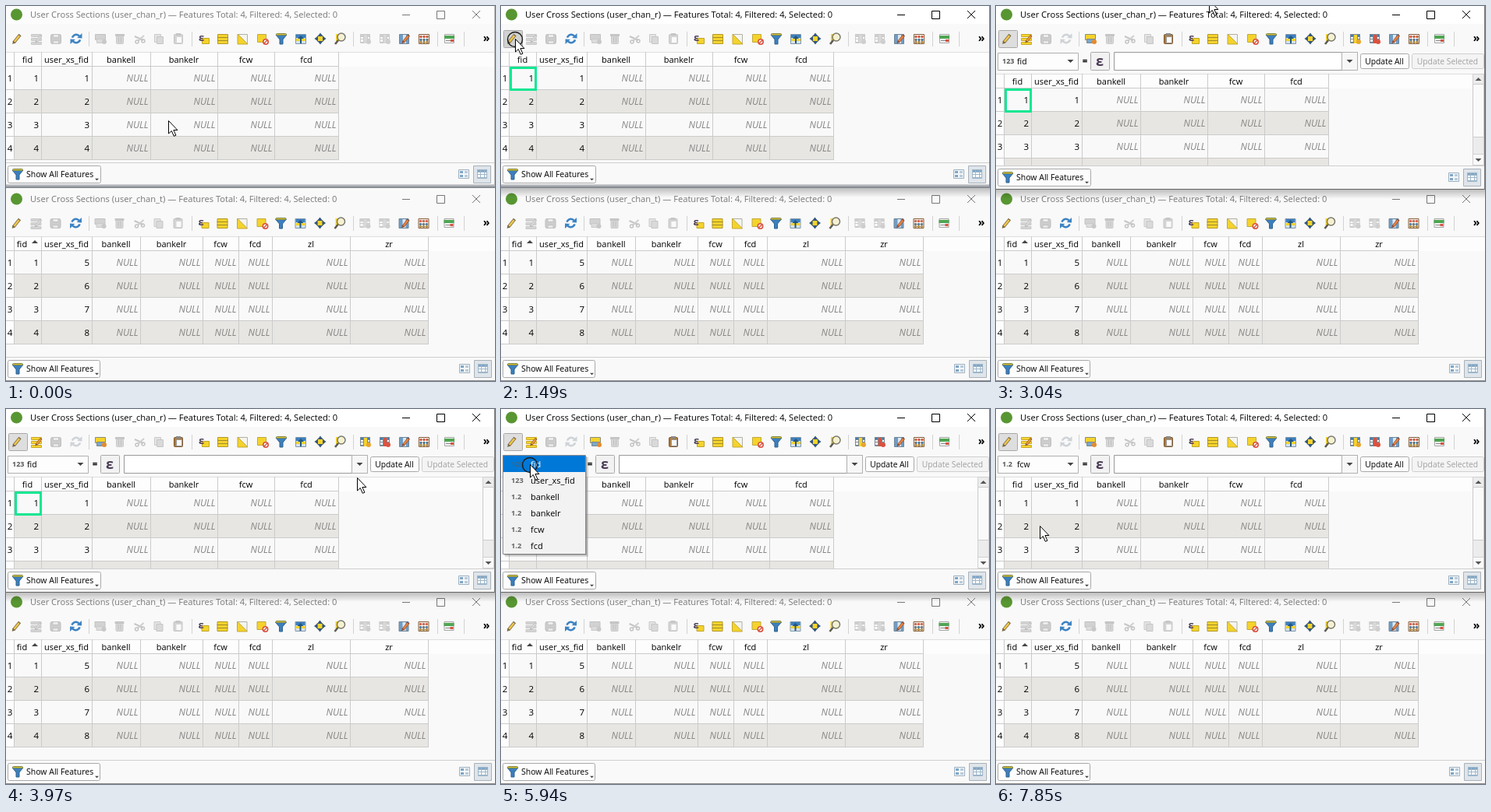
An HTML page with a canvas that plays this animation: 627 by 482 pixels, repeating every 7990 ms.

```html
<!DOCTYPE html>
<html lang="en">
<head>
<meta charset="utf-8">
<title>Attribute tables</title>
<style>
html, body { margin: 0; width: 100%; height: 100%; overflow: hidden; background: #f9f9f9; }
canvas { display: block; width: 627px; height: 482px; }
</style>
</head>
<body>
<canvas id="stage" width="627" height="482"></canvas>
<script>
const ctx = document.getElementById('stage').getContext('2d');
const LOOP = 7990, BG = '#f9f9f9', EDGE = '#cbcbcb', DIM = '#cacaca', INK = '#000';
const BLUE = '#3c7fbd', YELLOW = '#f5d32c', BROWN = '#ad7b3d', RED = '#d9513f';
const FAMILY = '"Open Sans", "Noto Sans", sans-serif';
const FIELDS = ['fid', 'user_xs_fid', 'bankell', 'bankelr', 'fcw', 'fcd'];
const PRESS = 1490, EDIT = 1640, OPEN = 5940, PICK = 7850, RING = 150;

// start, end, number of steps, then waypoints
const MOVES = [
  [370, 1090, 6, [56, 28], [18, 42]],
  [2530, 3040, 5, [133, 112], [175, 164], [279, 166], [279, 70], [273, -8]],
  [3170, 3430, 3, [152, 66]],
  [3580, 3970, 4, [300, 62], [450, 88]],
  [4720, 5140, 4, [134, 125]],
  [5280, 5680, 4, [37, 71]],
  [6390, 7020, 6, [61, 125]],
  [7160, 7320, 2, [56, 148]],
  [7470, 7470, 1, [56, 150]]
];

function cursorAt(t) {
  let pos = [208, 147];
  for (const [start, end, steps, ...points] of MOVES) {
    if (t < start) break;
    const done = steps > 1 ? Math.floor((t - start + 1) / (end - start) * (steps - 1)) + 1 : 1;
    const u = Math.min(done, steps) / steps * points.length;
    const i = Math.min(Math.floor(u), points.length - 1);
    const a = i ? points[i - 1] : pos, b = points[i];
    pos = a.map((v, k) => Math.round(v + (b[k] - v) * (u - i)));
  }
  return pos;
}

function paint(fill, stroke, width = 1) {
  if (fill) { ctx.fillStyle = fill; ctx.fill(); }
  if (stroke) { ctx.strokeStyle = stroke; ctx.lineWidth = width; ctx.stroke(); }
}
function box(x, y, w, h, fill, stroke, r = 0) {
  ctx.beginPath();
  if (stroke) ctx.roundRect(x + .5, y + .5, w - 1, h - 1, r);
  else ctx.roundRect(x, y, w, h, r);
  paint(fill, stroke);
}
function shape(points, fill, stroke, width) {
  ctx.beginPath();
  for (let i = 0; i < points.length; i += 2) ctx.lineTo(points[i], points[i + 1]);
  if (fill) ctx.closePath();
  paint(fill, stroke, width);
}
function disc(x, y, r, fill, stroke, width) {
  ctx.beginPath();
  ctx.arc(x, y, r, 0, 7);
  paint(fill, stroke, width);
}
function fade(y, h, from, to) {
  const g = ctx.createLinearGradient(0, y, 0, y + h);
  g.addColorStop(0, from);
  g.addColorStop(1, to);
  box(0, y, 627, h, g);
}
const hline = (x, y, w, c = EDGE) => box(x, y, w, 1, c);
const vline = (x, y, h, c = EDGE) => box(x, y, 1, h, c);
function text(str, x, y, size = 11, color = INK, align = 'left', style = '') {
  ctx.font = `${style} ${size}px ${FAMILY}`;
  ctx.textAlign = align;
  ctx.fillStyle = color;
  ctx.fillText(str, x, y);
}
function at(x, y, draw) {
  ctx.save();
  ctx.translate(x, y);
  draw();
  ctx.restore();
}
const caret = (x, y, s, c = '#444', dir = 1) =>
  shape([x - s, y - s * dir / 2, x + s, y - s * dir / 2, x, y + s * dir / 2], c);

function grid(x, y, w, h, head, line) {
  box(x, y, w, h, '#fff', line);
  box(x, y, w, 4, head, line);
  for (let i = 1; i < 3; i++) {
    vline(x + Math.round(w * i / 3), y, h, line);
    hline(x, y + 2 + Math.round(h * i / 3), w, line);
  }
}
function pen(x, y, s, body, tip) {
  shape([x - 4 * s, y + 5 * s, x + 4 * s, y - 5 * s], null, tip, 4 * s);
  shape([x - 3.2 * s, y + 4 * s, x + 3.2 * s, y - 4 * s], null, body, 2.6 * s);
  shape([x - 5.8 * s, y + 7 * s, x - 5 * s, y + 3 * s, x - 2.2 * s, y + 5.4 * s], tip);
}
function funnel() {
  shape([-7, -5, 7, -5, 2, 1, 2, 7, -2, 7, -2, 1], BLUE, '#2f628f');
  box(-7, -7, 14, 3, '#d8c23c', '#7f8746', 1);
}

const ICONS = {
  pencil: () => pen(0, 0, 1, '#efc64a', '#75664a'),
  multi(on) {
    for (let i = 0; i < 3; i++) box(-7, -6 + i * 5, 14, 4, on ? YELLOW : '#d4d4d4', on ? '#c9a92b' : DIM);
    pen(3, 0, .8, on ? '#f09a3c' : '#dadada', on ? '#8a5a2a' : '#bcbcbc');
  },
  save() {
    box(-7, -6, 14, 13, '#cdcdcd', '#bdbdbd', 2);
    box(-4, -6, 8, 5, '#ececec', '#c3c3c3');
    box(-4, 2, 8, 5, '#e6e6e6', '#c3c3c3');
  },
  refresh(on) {
    const c = on ? '#3d83c4' : '#cfd3d7';
    for (const turn of [0, Math.PI]) {
      ctx.save();
      ctx.rotate(turn);
      ctx.beginPath();
      ctx.arc(0, 0, 5.2, 3.4, 5.7);
      paint(null, c, 2.6);
      shape([7.5, -7, 7.5, -.5, 1.2, -1], c);
      ctx.restore();
    }
  },
  add(on) {
    box(-7, -6, 14, 8, on ? YELLOW : '#d2d2d2', on ? '#8c8c7a' : '#c2c2c2');
    box(-5, 0, 11, 6, on ? '#7aa7cd' : '#dcdcdc', on ? '#7c8790' : DIM);
    disc(5, 4, 3, on ? '#e58b2d' : '#c8c8c8');
  },
  trash() {
    box(-5, -4, 10, 11, '#d6d6d6', DIM, 1);
    box(-6, -6, 12, 3, '#cacaca', '#c2c2c2');
    for (const x of [-2, 1]) vline(x, -2, 7, '#c0c0c0');
  },
  cut() {
    shape([-6, -3, 5, 2], null, '#c6c6c6', 2);
    shape([6, -4, -2, 3], null, '#cfcfcf', 2);
    disc(-3, 4, 2, null, '#c4c4c4', 1.5);
    disc(5, 3, 2, null, '#c4c4c4', 1.5);
  },
  copy() {
    box(-6, -6, 9, 11, '#e4e4e4', DIM);
    box(-3, -3, 9, 10, '#d9d9d9', '#c6c6c6');
  },
  paste(on) {
    box(-6, -6, 12, 13, on ? BROWN : '#d3d3d3', on ? '#80562a' : '#c6c6c6', 1);
    box(-3, -3, 8, 9, '#fafafa', on ? '#999' : '#d6d6d6');
    box(-3, -7, 6, 3, on ? '#8a8a8a' : '#c6c6c6');
  },
  expr() {
    box(-3, -1, 10, 8, YELLOW, '#c0a428');
    text('ε', -7, 3, 13, '#4a3a55', 'left', 'bold');
  },
  all() {
    box(-7, -6, 14, 13, YELLOW, '#b3982a');
    for (const y of [-2, 2]) hline(-7, y, 14, '#a08a2a');
  },
  invert() {
    box(-6, -6, 13, 13, '#f4f4f0', '#b0b0a4');
    shape([-6, -6, 7, 7, -6, 7], YELLOW, '#c4a836');
  },
  clear() {
    box(-7, -6, 12, 11, YELLOW, '#c0a93c');
    disc(4, 4, 3.2, '#fff', RED, 1.6);
    shape([2, 6, 6, 2], null, RED, 1.4);
  },
  filter: funnel,
  top() {
    box(-7, -6, 14, 13, '#d5e2ec', '#7f97aa');
    box(-6, -5, 12, 4, BLUE);
    box(-6, 0, 12, 3, YELLOW);
    caret(0, -2, 4, '#24567f', -1);
    box(-1, 0, 2, 6, '#24567f');
  },
  pan() {
    box(-4, -4, 8, 8, YELLOW, '#c0a428');
    for (let i = 0; i < 4; i++) {
      shape([-3.5, -3, 3.5, -3, 0, -7.5], '#34567c');
      ctx.rotate(Math.PI / 2);
    }
  },
  zoom() {
    box(-5, -6, 10, 9, YELLOW);
    disc(2, -2, 5, 'rgba(245,245,235,.85)', '#77776c', 1.5);
    shape([-2, 2, -6, 7], null, '#5c5c54', 2.6);
  },
  newField(on) {
    grid(-7, -6, 13, 12, on ? BLUE : '#d0d0d0', on ? '#7c8790' : DIM);
    box(-2, -5, 4, 11, on ? YELLOW : '#d8d8d8');
    disc(4, 4, 3, on ? '#e7a52d' : '#cecece');
  },
  delField(on) {
    grid(-7, -6, 13, 12, on ? BLUE : '#d0d0d0', on ? '#7c8790' : DIM);
    box(-2, -5, 4, 11, on ? RED : '#d8d8d8');
    disc(4, 4, 3, on ? RED : '#cecece');
  },
  columns() {
    box(-7, -6, 13, 13, '#6f9dc6', '#6e8598');
    box(-2, -5, 4, 11, '#dce7f0');
    pen(2, 0, .9, '#e8823f', '#8a4a32');
  },
  calc() {
    box(-7, -6, 14, 13, '#f4eee6', '#86603c');
    for (const [y, c] of [[-3, RED], [1, '#44759f'], [4, '#b08a3a']]) {
      hline(-6, y, 12, '#a58a6c');
      for (const x of [-5, -1, 3]) box(x, y - 1, 2, 3, c);
    }
  },
  format() {
    box(-6, -6, 13, 12, '#f5f5f5', '#a5a5a5');
    box(-6, -4, 13, 4, '#4fa552');
    hline(-4, 2, 9, '#888');
    box(2, 1, 4, 3, RED);
  }
};
const TOOLS = [['pencil', 14], ['multi', 39], ['save', 64], ['refresh', 90], ['add', 121], ['trash', 146],
  ['cut', 171], ['copy', 196], ['paste', 221], ['expr', 254], ['all', 278], ['invert', 303], ['clear', 329],
  ['filter', 353], ['top', 378], ['pan', 403], ['zoom', 428], ['newField', 461], ['delField', 486],
  ['columns', 511], ['calc', 536], ['format', 568]];

function titleBar(y, layer, active) {
  const c = active ? INK : '#777';
  disc(13.5, y, 7.5, '#589632');
  text(`User Cross Sections (${layer}) — Features Total: 4, Filtered: 4, Selected: 0`, 31, y + 4, 11.14, c);
  hline(508, y, 10, c);
  box(552, y - 5, 11, 11, null, c);
  shape([598, y - 5, 608, y + 5], null, c);
  shape([608, y - 5, 598, y + 5], null, c);
}

function toolbar(y, edit, dx = 0) {
  for (const [name, x] of TOOLS) {
    const on = name === 'refresh' ? !edit : edit;
    at(x + dx, y, () => ICONS[name](on));
  }
  for (const x of [106, 238, 445, 553, 587]) vline(x, y - 9, 19, '#d2d2d2');
  text('»', 616, y + 4, 14, INK, 'center', 'bold');
}

function table(y, bottom, cols, heads, firstId, sorted) {
  const right = cols[cols.length - 1];
  ctx.save();
  ctx.beginPath();
  ctx.rect(0, y, 627, bottom - y);
  ctx.clip();
  box(0, y, 627, 19, '#fdfdfd');
  box(0, y, 10, 139, '#fdfdfd');
  hline(0, y, 627, '#dedede');
  heads.forEach((h, i) => {
    const mid = (cols[i] + cols[i + 1]) / 2;
    text(h, mid - (sorted && !i ? 7 : 0), y + 14, 11, INK, 'center', '500');
  });
  if (sorted) caret(37, y + 7, 4, '#444', -1);
  for (let r = 0; r < 4; r++) {
    const top = y + 19 + r * 30, base = top + 19;
    box(10, top, right - 10, 30, r % 2 ? '#e8e6e2' : BG);
    hline(0, top + 29, right);
    text(r + 1, 5, base, 11.5, INK, 'center', '500');
    text(r + 1, 42, base, 11.5, INK, 'right', '500');
    text(firstId + r, 107, base, 11.5, INK, 'right', '500');
    for (let c = 2; c < heads.length; c++) {
      text('NULL', cols[c + 1] - 2.5, base, 12, '#868686', 'right', 'italic');
    }
  }
  hline(0, y + 18, right);
  for (const x of cols) vline(x, y, 139);
  ctx.restore();
}

function statusBar(y, dx = 0) {
  box(2, y, 120 - dx, 23, '#fdfdfd', '#a9a9a9', 2);
  at(15, y + 11, funnel);
  text('Show All Features', 26, y + 15, 10.5, INK, 'left', '500');
  caret(116.5, y + 18, 2.5);
  const cy = y + 11;
  at(587 + dx, cy, () => {
    box(-7, -6, 14, 12, '#f4f7f9', '#9db0c0');
    for (const dy of [-4, 1]) {
      box(-5, dy, 4, 3, '#7fa6c6');
      box(1, dy, 4, 3, '#b9cbd9');
    }
  });
  box(599 + dx, y, 23, 23, '#dfe5ea', '#a9b2ba');
  at(611 + dx, cy, () => grid(-7, -6, 13, 12, '#7fa6c6', '#9db6ca'));
}

function fieldBar(field, kind, hover) {
  box(2, 60, 104, 23, hover ? '#e5f1fb' : '#fdfdfd', hover ? '#0078d7' : '#b0b0b0');
  text(kind, 8, 74, 9, '#555', 'left', 'bold');
  text(field, 27, 75, 10.4);
  caret(95.5, 71, 4);
  text('=', 114, 75, 11.5, INK, 'center', 'bold');
  box(121, 59, 25, 24, '#f2f2f2', '#a9a9a9', 1);
  text('ε', 133, 77, 18, '#4a3a55', 'center', 'bold');
  box(151, 59, 313, 24, '#fff', '#9a9a9a');
  box(443, 59, 21, 24, '#f7f7f7', '#b0b0b0');
  caret(453.5, 71, 4);
  box(467, 61, 63, 20, '#fdfdfd', '#a9a9a9', 2);
  text('Update All', 498, 75, 10.3, INK, 'center', '500');
  box(533, 61, 93, 20, '#f4f4f4', '#cfcfcf', 2);
  text('Update Selected', 579, 75, 10.3, '#a0a0a0', 'center');
}

function scrollBar() {
  box(611, 87, 15, 118, '#ececec', '#d0d0d0');
  box(611, 100, 15, 69, '#fafafa', EDGE);
  box(611, 190, 15, 15, '#fafafa', '#d0d0d0');
  caret(618.5, 94, 4, '#555', -1);
  caret(618.5, 198, 4, '#555');
}

function fieldList(row) {
  box(5, 62, 107, 128, 'rgba(0,0,0,.13)');
  box(4, 61, 106, 127, 'rgba(0,0,0,.25)');
  box(2, 59, 107, 128, '#f2f2f2', '#8c8c8c');
  FIELDS.forEach((name, i) => {
    const y = 60 + i * 21, hot = i === row;
    if (hot) box(3, y, 105, 21, '#0078d7');
    text(i < 2 ? '123' : '1.2', 13, y + 14, 9.3, hot ? '#35688f' : '#666', 'left', 'bold');
    text(name, 38, y + 15, 11, hot ? '#fff' : INK, 'left', '500');
  });
}

function pointer(x, y, ring) {
  if (ring) disc(x, y + 1, 9.5, null, '#1c1c1c', 1.4);
  at(x + .5, y + .5, () =>
    shape([0, 0, 0, 16.5, 3.8, 13, 6.8, 19.8, 9.4, 18.7, 6.4, 12, 11.4, 12], '#fff', '#000'));
}

function topWindow(t, x, y) {
  const active = t >= PRESS, edit = t >= EDIT, picked = t >= PICK;
  const bottom = edit ? 236 : 232;
  box(0, 0, 627, bottom, BG);
  box(0, 0, 627, 23, active ? '#fff' : '#fcfcfc');
  titleBar(11, 'user_chan_r', active);
  const hover = !active && x > 2 && x < 28 && y > 30 && y < 55;
  if (active) box(3, 31, 25, 23, edit ? '#dedede' : '#d2d2d2', '#a8a8a8', 1);
  else if (hover) box(3, 31, 25, 23, '#ececec', '#c4c4c4', 1);
  toolbar(42, edit);
  const top = edit ? 87 : 59;
  if (edit) {
    const over = x > 2 && x < 106 && y >= 60 && y < 83;
    fieldBar(picked ? 'fcw' : 'fid', picked ? '1.2' : '123', over);
  }
  table(top, edit ? 205 : 201, [10, 45, 110, 185, 271, 344, 426], FIELDS, 1);
  if (edit) scrollBar();
  if (active && !picked) {
    ctx.strokeStyle = '#0fe792';
    ctx.lineWidth = 3;
    ctx.strokeRect(12.5, top + 20.5, 32, 28);
  }
  hline(0, edit ? 205 : 201, 627, '#cfcfcf');
  statusBar(edit ? 209 : 205);
  if (edit) hline(0, bottom - 1, 627, '#666');
  else fade(229, 5, '#d6d7d9', '#757b84');
  if (active) fade(edit ? bottom : 234, 12, 'rgba(0,0,0,.24)', 'rgba(0,0,0,0)');
  vline(626, 0, bottom, active ? '#777' : '#b5b5b5');
}

function bottomWindow() {
  box(0, 234, 627, 248, BG);
  titleBar(248, 'user_chan_t', false);
  toolbar(279, false, -.5);
  table(296, 451, [10, 45, 110, 172, 252, 298, 341, 441, 541], [...FIELDS, 'zl', 'zr'], 5, true);
  hline(0, 451, 627, '#cfcfcf');
  statusBar(455, 1);
  hline(0, 481, 627, '#8c8c8c');
}

function draw(t) {
  const [x, y] = cursorAt(t);
  bottomWindow();
  topWindow(t, x, y);
  if (t >= OPEN && t < PICK) fieldList(Math.floor((y - 63) / 21));
  const ring = [PRESS, OPEN].some(s => t >= s && t < s + RING);
  pointer(x, y, ring);
}

const begin = performance.now();
function tick() {
  draw((performance.now() - begin) % LOOP);
  requestAnimationFrame(tick);
}
tick();
</script>
</body>
</html>
```
